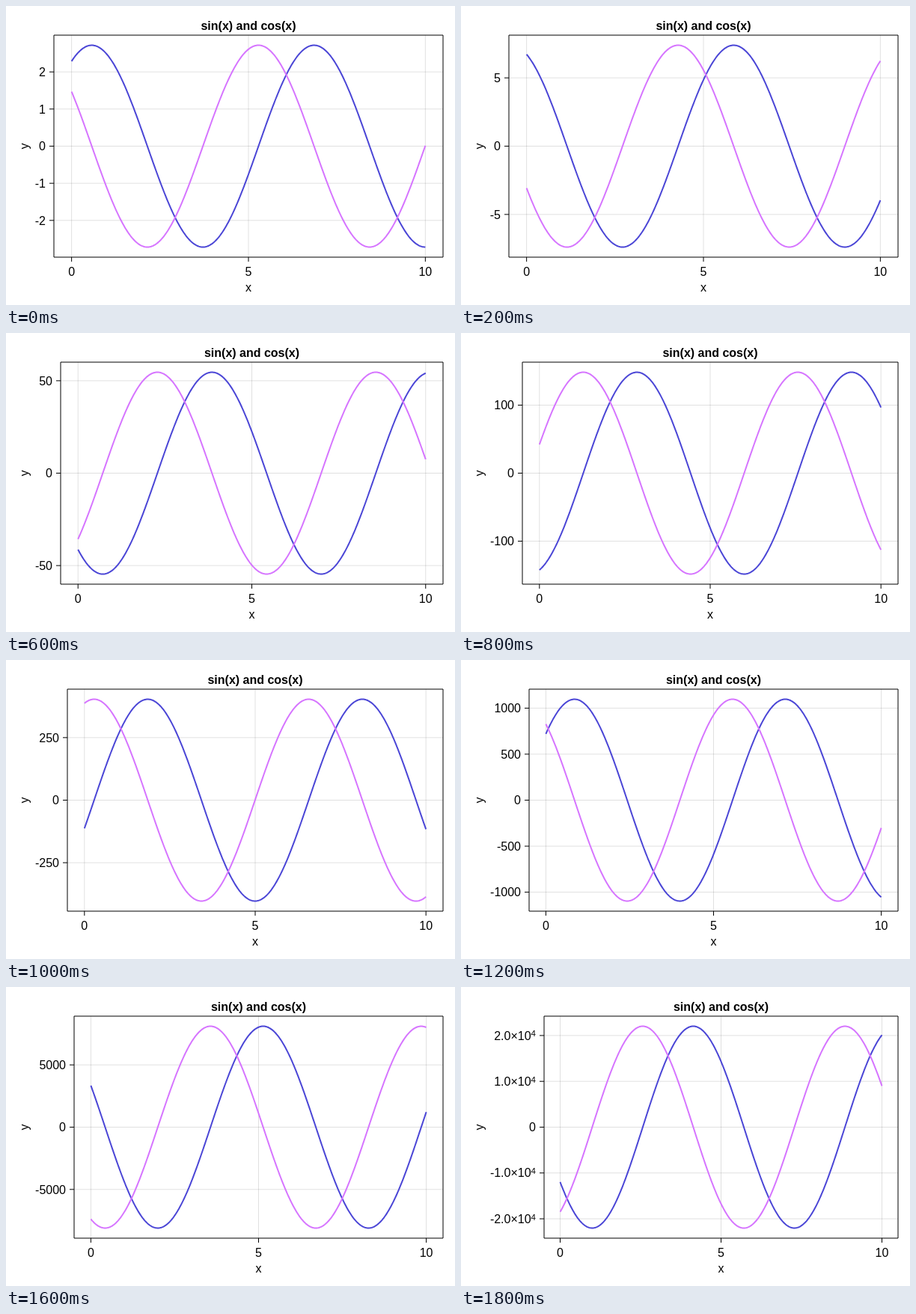
An HTML page with a canvas for the animation above (2000 ms loop, 600 px wide and 400 px high).

```html
<!DOCTYPE html>
<html>
<head>
<meta charset="utf-8">
<style>
html, body { margin: 0; width: 600px; height: 400px; overflow: hidden; background: #fff; }
canvas { display: block; }
</style>
</head>
<body>
<canvas id="plot" width="600" height="400"></canvas>
<script>
const ctx = document.getElementById('plot').getContext('2d');
const FAMILY = '"Liberation Sans", Arial, sans-serif';
const TOP = 39, BOTTOM = 336, RIGHT = 584, TICK = 6, STEP_MS = 200;
const tickSteps = [1, 5, 10, 50, 100, 250, 500, 2000, 5000, 10000];

function line(x1, y1, x2, y2, color) {
  ctx.strokeStyle = color;
  ctx.lineWidth = 1;
  ctx.beginPath();
  ctx.moveTo(x1, y1);
  ctx.lineTo(x2, y2);
  ctx.stroke();
}

function text(str, x, y, align = 'center', style = '16px') {
  ctx.font = `${style} ${FAMILY}`;
  ctx.textAlign = align;
  ctx.fillStyle = '#000';
  ctx.fillText(str, x, y);
  return ctx.measureText(str).width;
}

// Splits a tick value into its main text and exponent.
function tickLabel(value) {
  const scientific = Math.abs(value) >= 10000;
  return scientific ? [(value / 10000).toFixed(1) + '×10', '4'] : [String(value), ''];
}

function labelWidth([main, exponent]) {
  ctx.font = `16px ${FAMILY}`;
  return ctx.measureText(main).width + (exponent ? 6.4 : 0);
}

function curve(fn, px, py, color) {
  ctx.strokeStyle = color;
  ctx.lineWidth = 2;
  ctx.lineJoin = 'round';
  ctx.beginPath();
  for (let i = 0; i <= 400; i++) ctx.lineTo(px(i / 40), py(fn(i / 40)));
  ctx.stroke();
}

function draw(k) {
  const amp = Math.exp(k), limit = amp * 1.1, step = tickSteps[k - 1];
  const count = Math.floor(limit / step);
  const left = Math.round(49.8 + labelWidth(tickLabel(-count * step)));
  const middle = (TOP + BOTTOM) / 2, center = (left + RIGHT) / 2;
  const px = x => left + (x + 0.5) / 11 * (RIGHT - left);
  const py = y => middle - y / limit * (BOTTOM - TOP) / 2;
  const grid = 'rgba(0,0,0,0.12)';

  ctx.fillStyle = '#fff';
  ctx.fillRect(0, 0, 600, 400);

  for (const x of [0, 5, 10]) {
    line(px(x), TOP, px(x), BOTTOM, grid);
    line(px(x), BOTTOM, px(x), BOTTOM + TICK, '#000');
    text(x, px(x), 360.5);
  }
  for (let i = -count; i <= count; i++) {
    const y = py(i * step), [main, exponent] = tickLabel(i * step);
    line(left, y, RIGHT, y, grid);
    line(left - TICK, y, left, y, '#000');
    if (exponent) text(exponent, left - 11, y + 1.5, 'right', '11.5px');
    text(main, left - 11 - (exponent ? 6.4 : 0), y + 5.7, 'right');
  }

  curve(x => amp * Math.sin(x + k), px, py, '#4b46d6');
  curve(x => amp * Math.cos(x + k), px, py, '#d675ff');

  ctx.strokeStyle = '#000';
  ctx.lineWidth = 1;
  ctx.strokeRect(left, TOP, RIGHT - left, BOTTOM - TOP);

  text('sin(x) and cos(x)', center, 32, 'center', 'bold 16px');
  text('x', center, 382);
  ctx.save();
  ctx.translate(30, middle);
  ctx.rotate(-Math.PI / 2);
  text('y', 0, 0);
  ctx.restore();
}

function frame() {
  draw(1 + Math.floor(performance.now() / STEP_MS) % tickSteps.length);
  requestAnimationFrame(frame);
}
frame();
</script>
</body>
</html>
```
